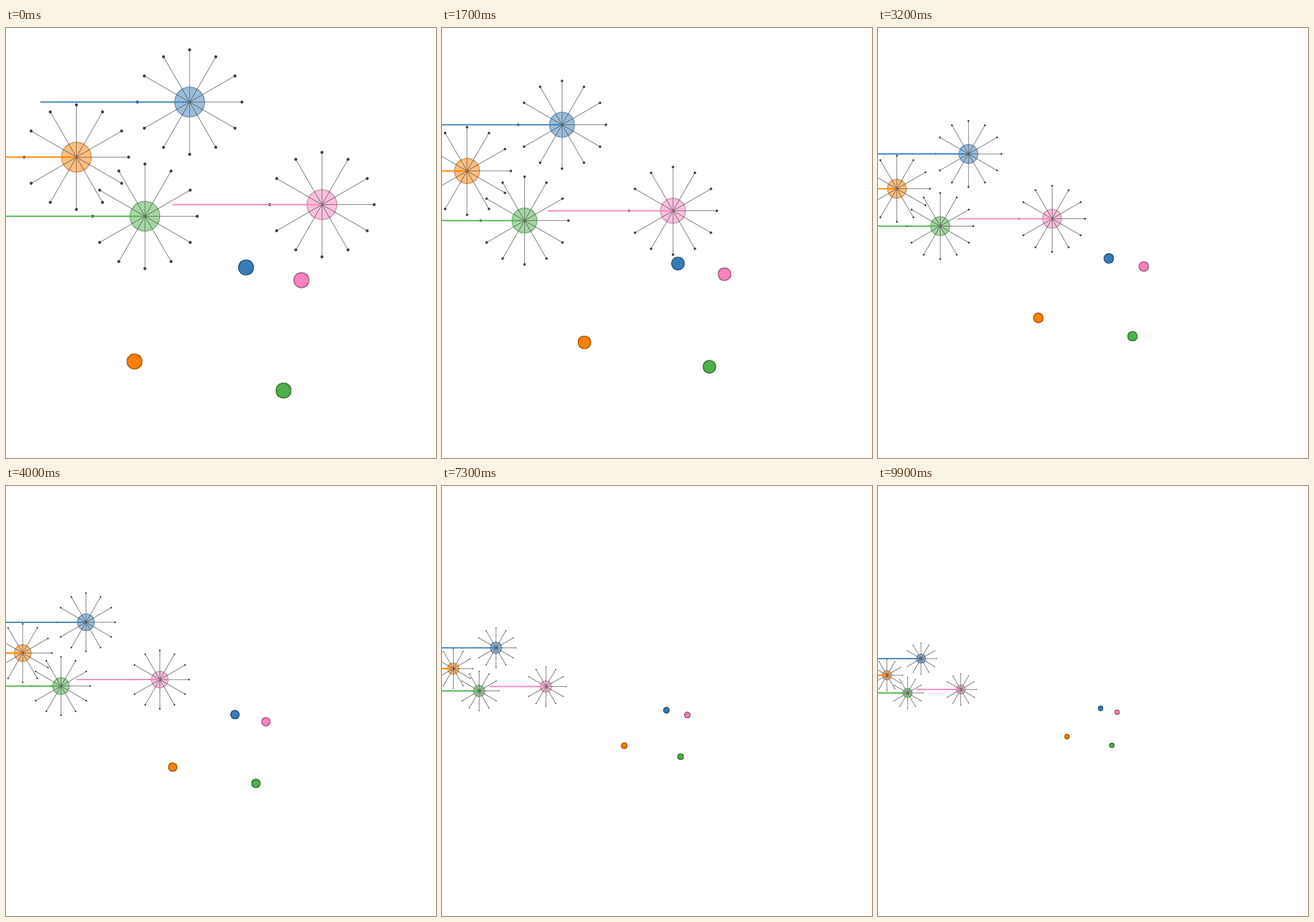
Recreate the animation shown at these times as a matplotlib script. Size 700x700 px, loop 10000 ms.

```python
import matplotlib.pyplot as plt
import numpy as np
from matplotlib.animation import FuncAnimation
from matplotlib.patches import Circle

SIZE, DPI, FRAMES, INTERVAL = 700, 100, 100, 100
PX = 72 / DPI                      # one pixel in points
RADIUS, REACH, RAYS = 0.1, 0.35, 12
MIN_VIEW, MARGIN = 1.44, 2 * RADIUS
DRAG, CRUISE = 0.25, 0.0375        # drag and top speed, per step
GRAY = (0.25, 0.25, 0.25)

# colour, agent start, goal
AGENTS = [
    ((0.22, 0.49, 0.72), (-0.210, 0.944), (0.1675, -0.1637)),
    ((1.00, 0.50, 0.00), (-0.9685, 0.575), (-0.5793, -0.7936)),
    ((0.30, 0.69, 0.29), (-0.5094, 0.179), (0.4188, -0.9882)),
    ((0.97, 0.51, 0.75), (0.676, 0.257), (0.5386, -0.2490)),
]
ANGLES = 2 * np.pi * np.arange(RAYS) / RAYS
SPOKES = REACH * np.column_stack([np.cos(ANGLES), np.sin(ANGLES)])


def travel(i):
    """Distance covered under constant thrust and drag, already moving at i = 0."""
    return CRUISE * i - 0.09 * (1 - (1 - DRAG) ** i)


fig = plt.figure(figsize=(SIZE / DPI, SIZE / DPI), dpi=DPI, facecolor="white")
ax = fig.add_axes([0, 0, 1, 1])
ax.axis("off")


def disc(center, radius, color, alpha, z, outline=1):
    """Filled disc with a half-dark, half-transparent pixel outline."""
    dark = tuple(c / 2 for c in color)
    return ax.add_patch(Circle(
        center, radius, fc=(*color, alpha), ec=(*dark, alpha / 2),
        lw=outline * PX, antialiased=not outline, zorder=z))


def stroke(color, width, z):
    return ax.plot([], [], color=color, lw=width * PX, zorder=z, snap=False,
                   solid_capstyle="butt")[0]


class Agent:
    def __init__(self, color, start, z):
        self.start = np.array(start)
        self.body = disc(start, RADIUS, color, 0.5, z)
        self.rays = [stroke(GRAY, 0.7, z + 1) for _ in SPOKES]
        self.tips = [disc(start, RADIUS / 10, GRAY, 1, z + 2, outline=0)
                     for _ in SPOKES]
        self.thrust = stroke(color, 2, z + 3)

    def move(self, dist):
        x, y = self.start - (dist, 0)
        self.body.center = x, y
        for (dx, dy), ray, tip in zip(SPOKES, self.rays, self.tips):
            ray.set_data([x, x + dx], [y, y + dy])
            tip.center = x + dx, y + dy
        self.thrust.set_data([x - 1, x], [y, y])


agents = []
for k, (color, start, goal) in enumerate(AGENTS, 1):
    disc(goal, RADIUS / 2, color, 1, 1)
    agents.append(Agent(color, start, 10 * k))
leftmost = min(agent.start[0] for agent in agents)


def update(i):
    dist = travel(i)
    for agent in agents:
        agent.move(dist)
    # the view widens to keep the leading agent inside
    view = max(MIN_VIEW, dist - leftmost + MARGIN)
    ax.set_xlim(-view, view)
    ax.set_ylim(-view, view)
    return []


anim = FuncAnimation(fig, update, frames=FRAMES, interval=INTERVAL,
                     init_func=lambda: update(0), repeat=True, repeat_delay=0,
                     blit=False)
plt.show()
```
